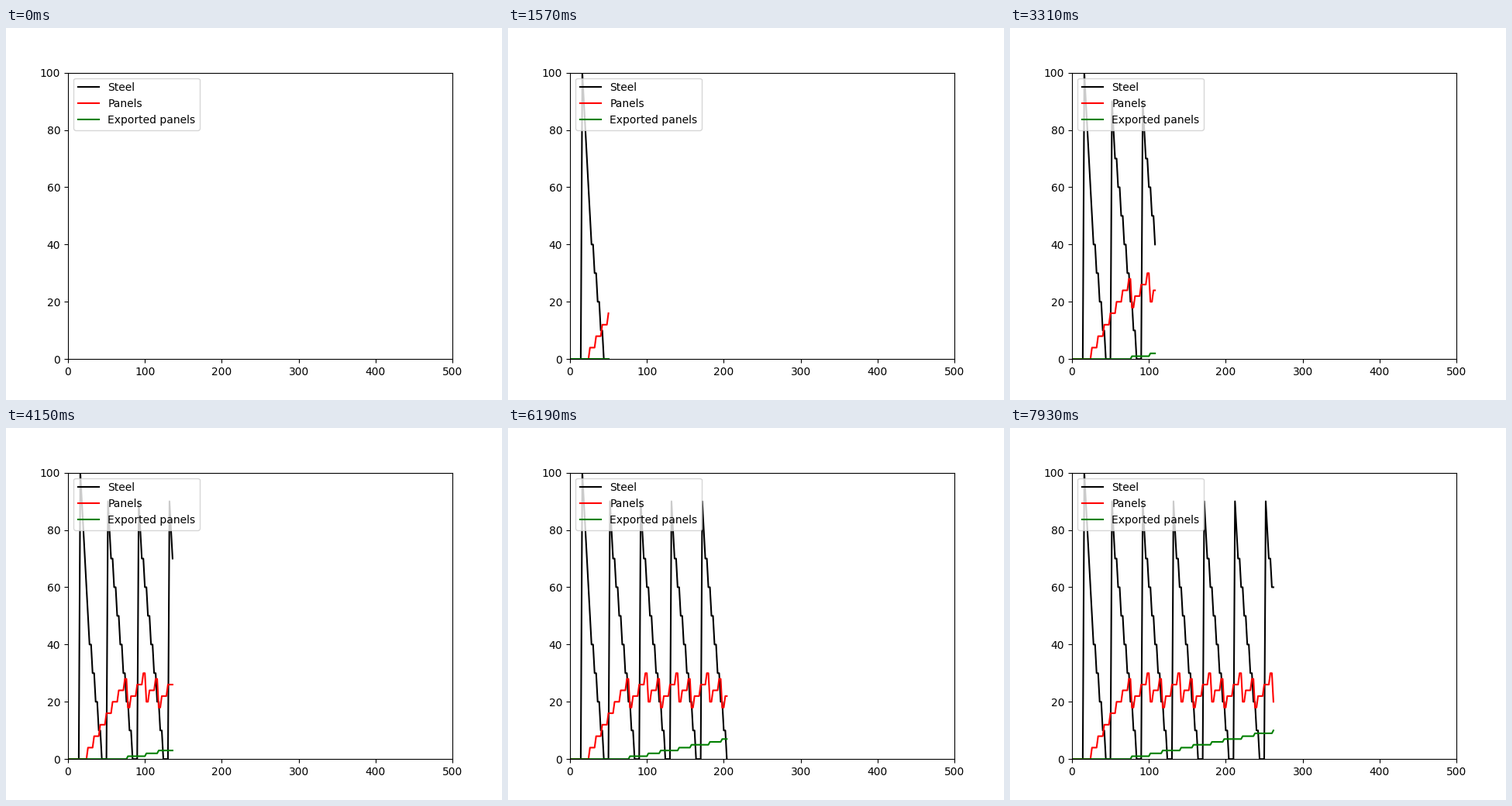
A matplotlib script that plays this animation: 640x480 px, repeating every 7990 ms.

```python
import numpy as np
import matplotlib.pyplot as plt
from matplotlib.animation import FuncAnimation

STEPS = 132          # samples, one every two time units
LOOP_MS = 7990
HOLD = 1             # the empty chart stays for one extra tick

t = 2 * np.arange(STEPS)


def steel_level(x):
    """Stock is used up in tens and refilled on a 40-unit cycle."""
    if x < 16:
        return 0
    if x <= 28:
        return 100 - 5 * (x - 16)
    if x < 52:
        return max(0, 40 - 10 * ((x - 28) // 4))
    phase = (x - 52) % 40
    if phase <= 4:
        return 90 - 5 * phase
    if phase < 38:
        return max(0, 70 - 10 * ((phase - 4) // 4))
    return 0


def exported_count(x):
    """Exports leave at 78, 102, 118, 142, ... (two per cycle)."""
    return max(0, (x - 38) // 40) + max(0, (x - 62) // 40)


def panel_stock(x):
    made = 4 * max(0, (x - 18) // 8)
    return made - 10 * exported_count(x)


series = [
    ("Steel", "black", [steel_level(x) for x in t]),
    ("Panels", "red", [panel_stock(x) for x in t]),
    ("Exported panels", "green", [exported_count(x) for x in t]),
]

fig, ax = plt.subplots(figsize=(6.4, 4.8), dpi=100)
ax.set_xlim(0, 500)
ax.set_ylim(0, 100)
lines = [ax.plot([], [], color=color, label=name)[0]
         for name, color, _ in series]
ax.legend(loc="upper left")


def update(tick):
    n = max(0, tick - HOLD) + 1
    for line, (_, _, values) in zip(lines, series):
        line.set_data(t[:n], values[:n])
    return lines


ticks = STEPS + HOLD
anim = FuncAnimation(fig, update, frames=ticks, interval=LOOP_MS / ticks,
                     repeat=True, repeat_delay=0, blit=False)
plt.show()
```
